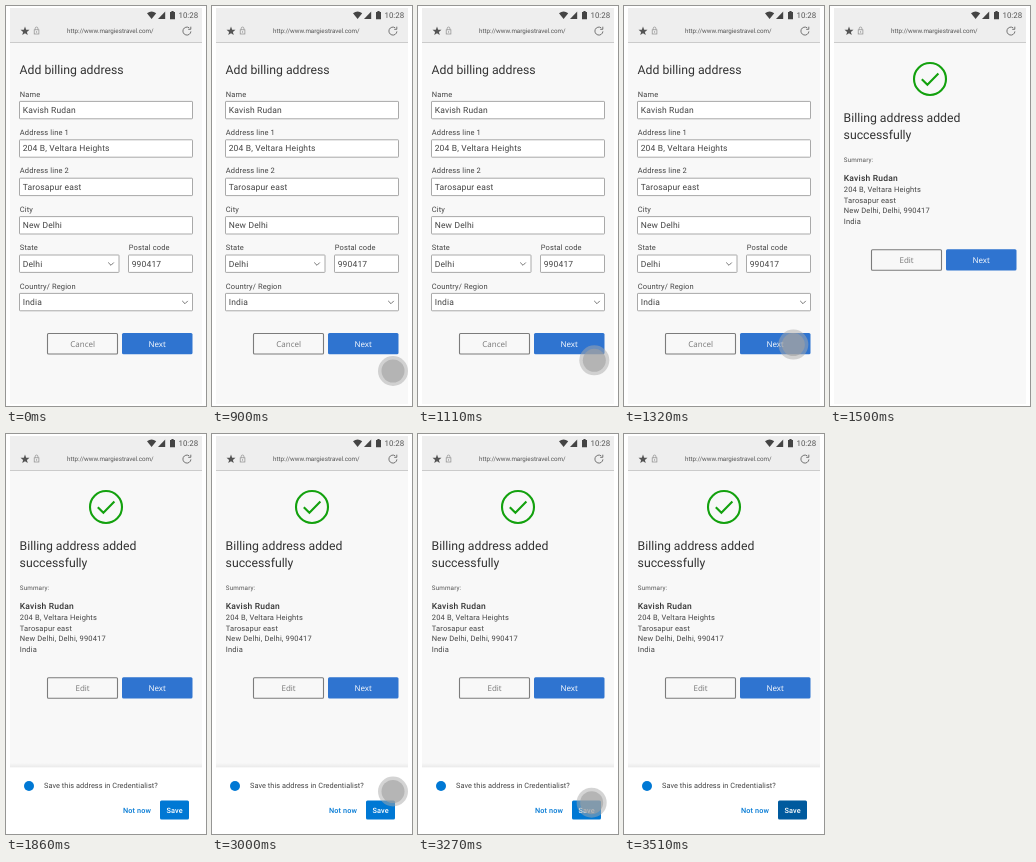
Animation, 200 px wide and 400 px high, one loop 4050 ms. Source, as an HTML page:

```html
<!DOCTYPE html>
<html lang="en">
<head>
<meta charset="utf-8">
<title>Billing address</title>
<style>
html, body { margin: 0; width: 100%; height: 100%; overflow: hidden; background: #fff; }
svg { display: block; width: 200px; height: 400px; }
text { font-family: Roboto, "Noto Sans", sans-serif; fill: #444; white-space: pre; text-rendering: geometricPrecision; }
.title { font-size: 12.25px; fill: #333; }
.label { font-size: 7.5px; letter-spacing: .13px; }
.value { font-size: 8.5px; letter-spacing: .16px; }
.line { font-size: 7.5px; letter-spacing: .16px; }
.name { font-size: 8.5px; font-weight: 500; letter-spacing: .2px; fill: #333; }
.small { font-size: 6.3px; letter-spacing: .14px; fill: #555; }
.url { font-size: 6.25px; fill: #555; }
.clock { font-size: 7.9px; fill: #555; }
.btn { font-family: "Open Sans", "Noto Sans", sans-serif; font-size: 8px; text-anchor: middle; }
.plain { fill: #777; }
.main { fill: #fff; font-weight: 500; }
.ask { font-size: 7.35px; letter-spacing: .06px; }
.act { font-size: 7.3px; font-weight: 500; letter-spacing: .1px; text-anchor: middle; }
.box { fill: #fff; stroke: #a0a0a0; stroke-width: .9; }
.hollow { fill: #f8f8f8; stroke: #7c7c7c; stroke-width: 1.1; }
.stroke { fill: none; stroke: #666; stroke-width: .9; }
.lock { fill: none; stroke: #8c8c8c; stroke-width: .7; }
</style>
</head>
<body>
<svg viewBox="0 0 200 400">
  <defs>
    <linearGradient id="shade" x1="0" y1="0" x2="0" y2="1">
      <stop offset="0" stop-color="#000" stop-opacity="0"/>
      <stop offset="1" stop-color="#000" stop-opacity=".06"/>
    </linearGradient>
  </defs>
  <rect x="4" y="2" width="192" height="396" fill="#f8f8f8"/>
  <rect x="4" y="2" width="192" height="34" fill="#eee"/>
  <path d="M4 36.5H196" stroke="#cbcbcb"/>
  <g fill="#444">
    <path d="M141 7.2Q145.6 4 150.2 7.2L145.6 13Z"/>
    <path d="M152 13H159.2V5.6Z"/>
    <path d="M164 6H165.4V5H167.6V6H169V13.2H164Z"/>
  </g>
  <text class="clock" x="172.5" y="12">10:28</text>
  <path id="star" fill="#555"/>
  <rect x="28.2" y="23.8" width="4.7" height="4.2" class="lock"/>
  <path d="M29.2 23.6V22.4a1.35 1.35 0 0 1 2.7 0V23.6" class="lock"/>
  <circle cx="30.55" cy="25.9" r=".6" fill="#8c8c8c"/>
  <text class="url" x="61" y="27">http://www.margiestravel.com/</text>
  <path d="M184.9 25.4A4 4 0 1 1 183.2 21.8M184.8 20.7V23.3H182.2" class="stroke"/>
  <g id="form"></g>
  <g id="done"></g>
  <g id="sheet">
    <rect x="4" y="329" width="192" height="4.5" fill="url(#shade)"/>
    <rect x="4" y="333.5" width="192" height="66.5" fill="#fff"/>
    <circle cx="23" cy="352" r="5" fill="#0078d4"/>
    <text class="ask" x="38" y="354.3">Save this address in Credentialist?</text>
    <text class="act" x="131" y="378.6" style="fill:#0078d4">Not now</text>
    <rect id="save" x="154" y="366.5" width="29" height="19" rx="1.5"/>
    <text class="act main" x="168.6" y="378.6">Save</text>
  </g>
  <g id="touch">
    <circle r="15" fill="#aaa" fill-opacity=".5"/>
    <circle r="11.5" fill="#a0a0a0" fill-opacity=".6"/>
  </g>
</svg>
<script>
const $ = id => document.getElementById(id);
const LOOP = 4050, STEP = 30;
const person = 'Kavish Rudan', street = '204 B, Veltara Heights', area = 'Tarosapur east', code = '990417';

const text = (cls, x, y, s) => `<text class="${cls}" x="${x}" y="${y}">${s}</text>`;
const field = (row, label, value, x = 13.5, w = 173) => {
  const y = 95.4 + row * 38.4;
  return text('label', x + .3, y - 4.8, label) +
    `<rect class="box" x="${x}" y="${y}" width="${w}" height="17.4" rx=".6"/>` +
    text('value', x + 3.2, y + 11.6, value);
};
const chevron = (x, y) => `<path class="stroke" d="M${x - 2.8} ${y - 1.3}l2.8 2.8l2.8 -2.8"/>`;
const buttons = (y, left, id) =>
  `<rect class="hollow" x="41.5" y="${y + .5}" width="70" height="20.5" rx="1"/>` +
  text('btn plain', 76.6, y + 13.8, left) +
  `<rect id="${id}" x="116" y="${y}" width="70.5" height="21.3" rx="1.5" fill="#2f74d0"/>` +
  text('btn main', 151.2, y + 13.8, 'Next');

$('form').innerHTML = text('title', 13.6, 68, 'Add billing address') +
  field(0, 'Name', person) + field(1, 'Address line 1', street) +
  field(2, 'Address line 2', area) + field(3, 'City', 'New Delhi') +
  field(4, 'State', 'Delhi', 13.5, 99.5) + field(4, 'Postal code', code, 122.5, 64) +
  field(5, 'Country/ Region', 'India') +
  chevron(105, 257.8) + chevron(179, 296.2) + buttons(327, 'Cancel', 'next');

const lines = [street, area, 'New Delhi, Delhi, ' + code, 'India'];
$('done').innerHTML =
  '<circle cx="100" cy="73" r="16" fill="none" stroke="#13a10e" stroke-width="2.1"/>' +
  '<path d="M91.8 73.2L97.4 78.8L108.4 67.6" fill="none" stroke="#13a10e" stroke-width="2.1"/>' +
  text('title', 13.6, 116, 'Billing address added') + text('title', 13.6, 132.8, 'successfully') +
  text('small', 13.8, 155.6, 'Summary:') + text('name', 13.8, 175, person) +
  lines.map((s, i) => text('line', 13.8, 186.2 + i * 10.6, s)).join('') +
  buttons(243.2, 'Edit', 'next2');

$('star').setAttribute('d', 'M' + Array.from({ length: 10 }, (_, i) => {
  const a = i * Math.PI / 5, r = i % 2 ? 2 : 4.7;
  return [19 + r * Math.sin(a), 25.3 - r * Math.cos(a)].map(v => v.toFixed(2));
}).join('L') + 'Z');

const clamp = v => Math.min(1, Math.max(0, v));
const smooth = p => p * p * (3 - 2 * p);
const mix = (a, b, p) => a + (b - a) * p;
const blend = (a, b, p) => `rgb(${a.map((v, i) => Math.round(mix(v, b[i], p)))})`;

const taps = [
  { start: 900, from: [181, 365], to: [168.3, 336.2] },
  { start: 3000, from: [181, 357.5], to: [167.5, 378] }
];
const TAP = 510;

function draw(t) {
  const press = taps.map(tap => clamp((t - tap.start - 420) / 90));
  const done = t >= 1500;
  $('form').style.display = done ? 'none' : '';
  $('done').style.display = done ? '' : 'none';
  $('next').setAttribute('fill', blend([47, 116, 208], [36, 94, 174], press[0]));
  $('save').setAttribute('fill', blend([0, 120, 212], [0, 90, 158], press[1]));

  const rise = clamp((t - 1650) / 210);
  $('sheet').style.display = rise > 0 ? '' : 'none';
  $('sheet').setAttribute('transform', `translate(0 ${68 * (1 - rise) ** 2})`);

  const i = taps.findIndex(tap => t >= tap.start && t < tap.start + TAP);
  $('touch').style.display = i < 0 ? 'none' : '';
  if (i < 0) return;
  const { start, from, to } = taps[i], p = smooth(clamp((t - start) / TAP));
  $('touch').setAttribute('transform', `translate(${mix(from[0], to[0], p)} ${mix(from[1], to[1], p)})`);
  $('touch').setAttribute('opacity', 1 - press[i] * .8);
}

function tick() {
  const t = performance.now() % LOOP;
  draw(Math.floor(t / STEP) * STEP);
  requestAnimationFrame(tick);
}
tick();
</script>
</body>
</html>
```
